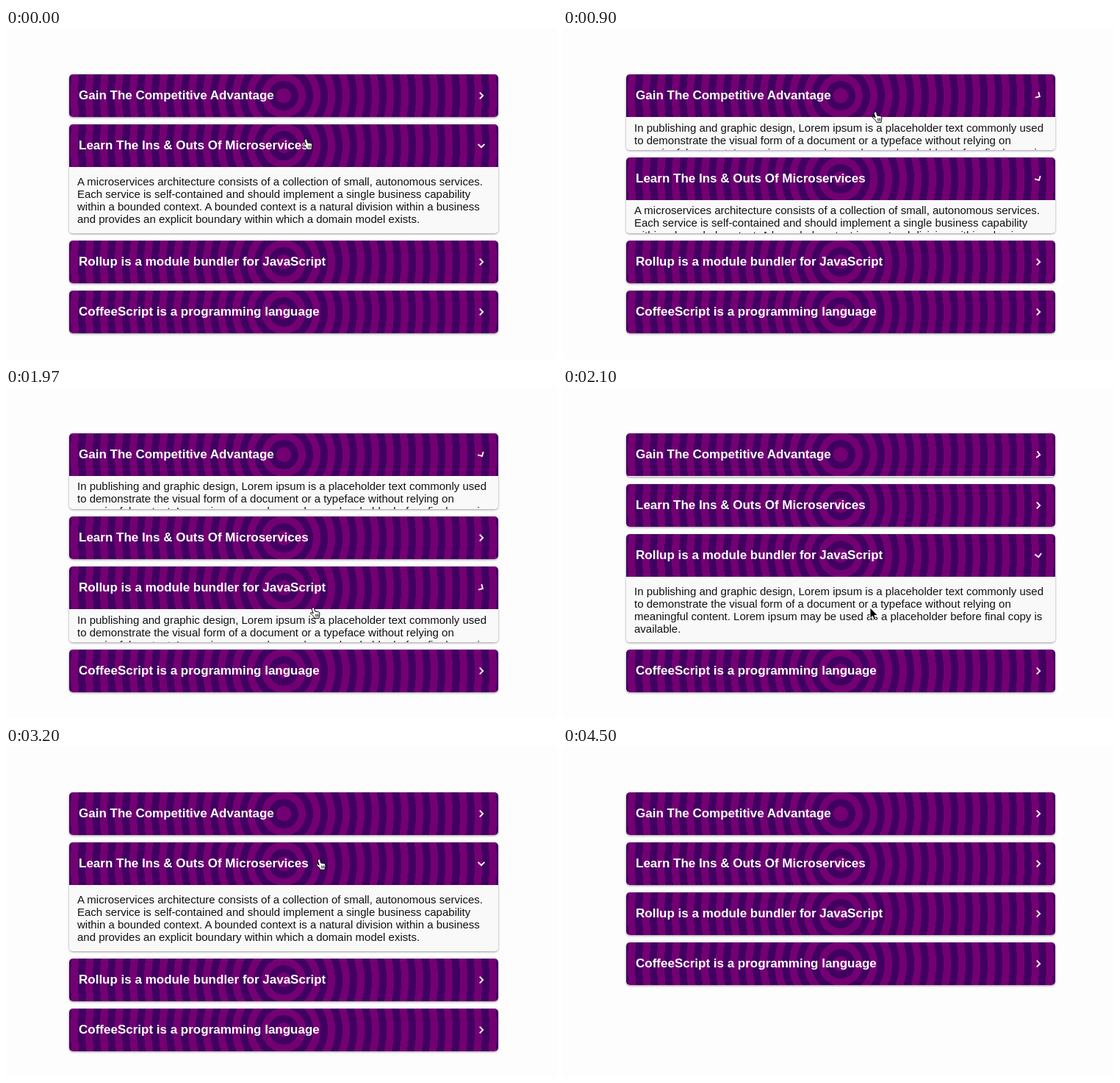
An HTML page that plays this animation: 750x450 px, repeating every 4.71 s.

```html
<!DOCTYPE html>
<html lang="en">
<head>
<meta charset="utf-8">
<title>Accordion</title>
<style>
html, body { margin: 0; width: 100%; height: 100%; overflow: hidden; background: #fdfdfd; }
body { position: relative; font: 15px/17px "Liberation Sans", Arial, Helvetica, sans-serif; color: #111; }
#list { position: absolute; left: 86px; top: 63px; width: 584px; }
.card { margin-bottom: 10px; border-radius: 5px; overflow: hidden; box-shadow: 0 1px 3px rgba(0, 0, 0, .4); }
.head {
  position: relative; height: 58px; box-sizing: border-box; padding-left: 13px;
  font-weight: bold; font-size: 17px; line-height: 57px; color: #fff;
  background: repeating-radial-gradient(circle, #730073, #730073 10px, #410061 10px, #410061 20px);
}
.chevron { position: absolute; left: 553px; top: 21px; width: 16px; height: 16px; }
.chevron path { fill: none; stroke: #fff; stroke-width: 1.8; }
.body { box-sizing: border-box; padding: 0 11px; overflow: hidden; white-space: pre; background: #f9f9f9; }
#pointer { position: absolute; left: 0; top: 0; width: 24px; height: 24px; overflow: visible; }
</style>
</head>
<body>
<div id="list"></div>
<svg id="pointer">
  <g id="hand" stroke="#000" stroke-linejoin="round" stroke-linecap="round" transform="translate(-4 -1)">
    <path fill="#fff" d="M3 1.2q1.6-1.2 2.6.8l1.3 4.4q1-1 2 .2q1-.8 1.9.3q1.3-.5 1.8.8q.8 2.8-.3 5l-.3 2.6h-5.8q-.8-2-3-3.8l-2.6-2.6q-.3-1.6 1.8-1.2l1.8 1.2-2-6q-.1-1 .8-1.7z"/>
    <path fill="none" stroke-width=".8" d="M7.4 10.2l.5 3M9.1 10l.4 3M10.8 9.8l.3 3"/>
  </g>
  <path id="arrow" stroke="#fff" stroke-width="1" d="M0 0v14.5l3.3-3.1 2.3 5.3 2.5-1.1-2.3-5.1h4.5z"/>
</svg>
<script>
const LOOP = 4710, SLIDE = 300, HEAD = 58, GAP = 10, BODY = 90, PAD = 11, TOP = 63;

const lorem = `In publishing and graphic design, Lorem ipsum is a placeholder text commonly used
to demonstrate the visual form of a document or a typeface without relying on
meaningful content. Lorem ipsum may be used as a placeholder before final copy is
available.`;
const services = `A microservices architecture consists of a collection of small, autonomous services.
Each service is self-contained and should implement a single business capability
within a bounded context. A bounded context is a natural division within a business
and provides an explicit boundary within which a domain model exists.`;

// toggles: times at which the panel opens or closes, alternating
const items = [
  { title: 'Gain The Competitive Advantage', text: lorem, open: 0, toggles: [750, 1820] },
  { title: 'Learn The Ins & Outs Of Microservices', text: services, open: 1, toggles: [750, 2678, 3215] },
  { title: 'Rollup is a module bundler for JavaScript', text: lorem, open: 0, toggles: [1820, 2678] },
  { title: 'CoffeeScript is a programming language', text: '', open: 0, toggles: [] }
];

// pointer tip: time, x, y
const path = [
  [0, 408, 151], [30, 408, 151], [560, 424, 108], [760, 425, 109], [900, 425, 114],
  [1080, 425, 140], [1400, 418, 300], [2150, 418, 300], [2600, 426, 150], [2700, 426, 150],
  [3000, 426, 154], [3230, 426, 154], [3570, 528, 77], [3700, 534, 69]
];
const POINTER_END = 3730;

const swing = p => .5 - Math.cos(Math.PI * p) / 2;
const turn = p => p ** 1.6;
const clamp = v => Math.min(1, Math.max(0, v));

function level(item, t, ease) {
  let value = item.open, sign = item.open ? -1 : 1;
  for (const start of item.toggles) {
    value += sign * ease(clamp((t - start) / SLIDE));
    sign = -sign;
  }
  return value;
}

function tip(t) {
  const i = path.findIndex(p => p[0] > t);
  if (i < 0) return path[path.length - 1].slice(1);
  const a = path[i - 1], b = path[i], k = swing((t - a[0]) / (b[0] - a[0]));
  return [a[1] + (b[1] - a[1]) * k, a[2] + (b[2] - a[2]) * k];
}

function add(parent, name, text = '') {
  const el = document.createElement('div');
  el.className = name;
  el.textContent = text;
  return parent.appendChild(el);
}

const $ = id => document.getElementById(id);
for (const item of items) {
  const card = add($('list'), 'card');
  const head = add(card, 'head', item.title);
  head.insertAdjacentHTML('beforeend',
    '<svg class="chevron" viewBox="-8 -8 16 16"><path d="M-2.2-4.4L2.2 0L-2.2 4.4"/></svg>');
  item.arrow = head.querySelector('path');
  item.body = add(card, 'body', item.text);
}

function draw(t) {
  const [x, y] = tip(t);
  let top = TOP, overHead = false;
  for (const item of items) {
    const s = level(item, t, swing), height = Math.round(BODY * s);
    item.body.style.height = height + 'px';
    item.body.style.paddingTop = PAD * s + 'px';
    item.body.style.display = height ? 'block' : 'none';
    item.arrow.setAttribute('transform', `rotate(${90 * level(item, t, turn)})`);
    if (y >= top && y < top + HEAD) overHead = true;
    top += HEAD + height + GAP;
  }
  $('pointer').style.display = t < POINTER_END ? 'block' : 'none';
  $('pointer').style.transform = `translate(${Math.round(x)}px, ${Math.round(y)}px)`;
  $('hand').style.display = overHead ? 'inline' : 'none';
  $('arrow').style.display = overHead ? 'none' : 'inline';
}

const start = performance.now();
function frame() {
  draw((performance.now() - start) % LOOP);
  requestAnimationFrame(frame);
}
frame();
</script>
</body>
</html>
```
